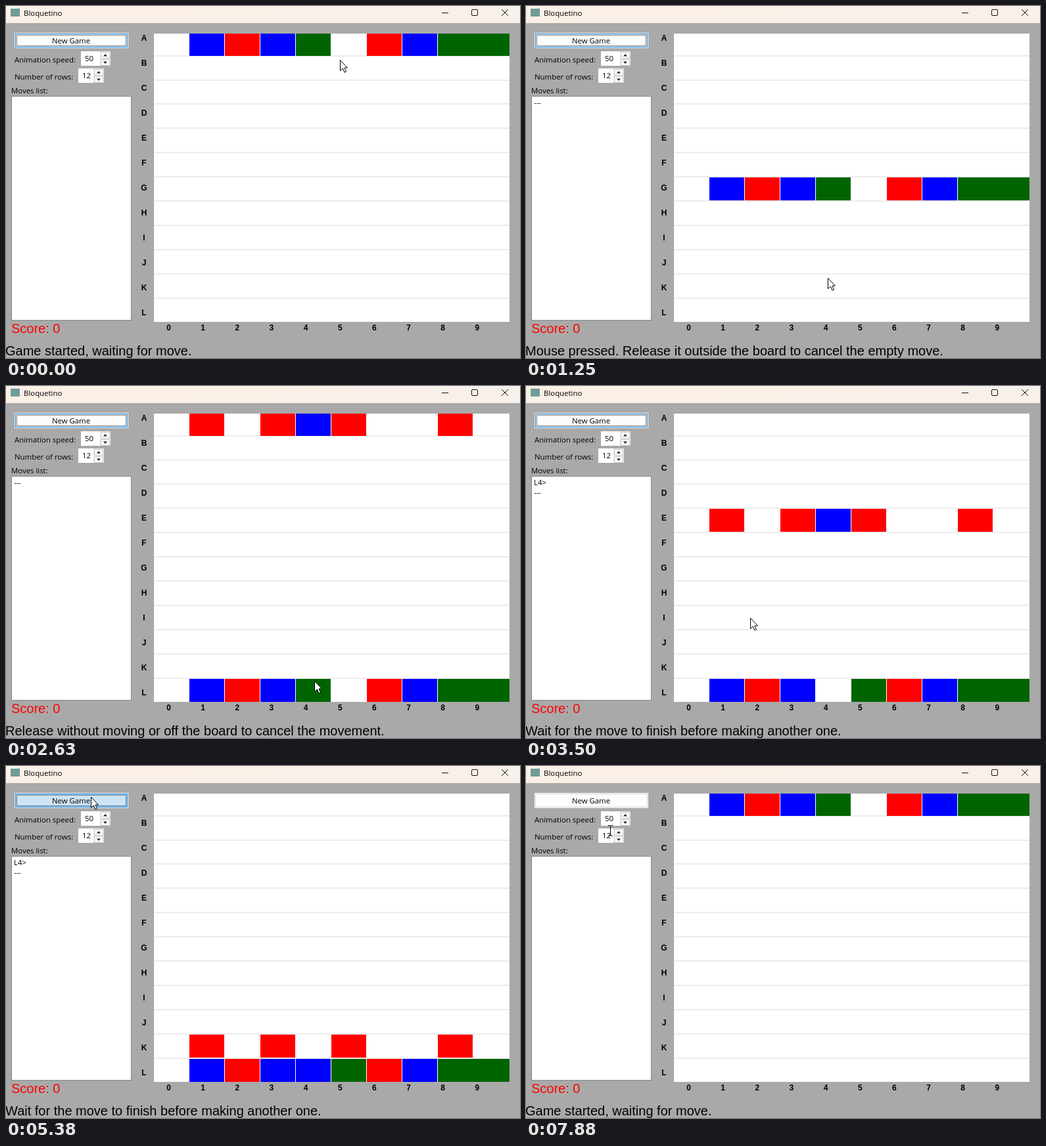
An HTML page with a canvas that plays this animation: 782 by 536 pixels, repeating every 8000 ms.

```html
<!DOCTYPE html>
<html lang="en">
<head>
<meta charset="utf-8">
<title>Bloquetino</title>
<style>
html, body { margin: 0; width: 100%; height: 100%; overflow: hidden; background: #a9a9a9; }
canvas { display: block; }
</style>
</head>
<body>
<canvas id="stage" width="782" height="536"></canvas>
<script>
const ctx = document.getElementById('stage').getContext('2d');
const LOOP = 8000, TICK = 125, ROW_TIME = 167;
const EMPTY_MOVE = 365, NEW_ROW = 2200, SLIDE = 2754, RESTART = 6000, BLUR = 7300;
const BOARD = { x: 225, y: 42, w: 541, h: 439 };
const RED = '#ff0000', BLUE = '#0000ff', GREEN = '#006400';
const UI = '11.4px "Open Sans", "Noto Sans", sans-serif';
const BIG = '20px "Liberation Sans", Arial, sans-serif';
const LABEL = 'bold 12px "Liberation Sans", Arial, sans-serif';

// Blocks: column, colour, width in cells
const firstRow = [[1, BLUE], [2, RED], [3, BLUE], [4, GREEN], [6, RED], [7, BLUE], [8, GREEN, 2]];
const slidRow = firstRow.map(([c, color, n]) => [c === 4 ? 5 : c, color, n]);
const secondRow = [[1, RED], [3, RED], [4, BLUE], [5, RED], [8, RED]];

// Pointer path: time, x, y
const path = [
  [0, 508, 82], [250, 507, 88], [500, 502, 130], [1250, 459, 414], [1750, 462, 432],
  [2375, 469, 449], [2625, 469, 449], [2875, 500, 448], [3500, 341, 353],
  [4500, 139, 35], [5000, 131, 46], [5625, 128, 48], [6500, 128, 48], [7500, 128, 98], [LOOP, 128, 98]
];

function rect(x, y, w, h, color) {
  ctx.fillStyle = color;
  ctx.fillRect(x, y, w, h);
}

function frame(x, y, w, h, color) {
  ctx.strokeStyle = color;
  ctx.lineWidth = 1;
  ctx.strokeRect(x + 0.5, y + 0.5, w - 1, h - 1);
}

function text(str, x, y, font = UI, color = '#000', align = 'left') {
  ctx.font = font;
  ctx.fillStyle = color;
  ctx.textAlign = align;
  ctx.fillText(str, x, y);
}

function polygon(points, fill, stroke) {
  ctx.beginPath();
  points.forEach(([x, y]) => ctx.lineTo(x, y));
  ctx.closePath();
  ctx.fillStyle = fill;
  ctx.fill();
  if (stroke) {
    ctx.strokeStyle = stroke;
    ctx.lineWidth = 1;
    ctx.stroke();
  }
}

function titleBar() {
  const shade = ctx.createLinearGradient(0, 0, 782, 0);
  shade.addColorStop(0, '#fbf0e6');
  shade.addColorStop(1, '#f8f0ea');
  rect(0, 0, 782, 26, shade);
  rect(7, 4, 14, 12, '#6f9c98');
  text('Bloquetino', 27, 15);
  rect(663, 10, 10, 1, '#111');
  ctx.strokeStyle = '#111';
  ctx.lineWidth = 1;
  ctx.beginPath();
  ctx.roundRect(708.5, 5.5, 9, 9, 1.5);
  ctx.moveTo(754, 5);
  ctx.lineTo(764, 15);
  ctx.moveTo(764, 5);
  ctx.lineTo(754, 15);
  ctx.stroke();
}

function button(focused, hover) {
  rect(13, 41, 173, 23, '#fff');
  rect(14, 42, 171, 21, hover ? '#cce4f7' : '#fdfdfd');
  if (focused) {
    frame(14, 42, 171, 21, '#0078d7');
    ctx.setLineDash([1, 1]);
    frame(16, 44, 167, 17, '#000');
    ctx.setLineDash([]);
  } else {
    frame(14, 42, 171, 21, '#d0d0d0');
  }
  text('New Game', 99, 57, UI, '#000', 'center');
}

function spinner(x, y, fieldWidth, value) {
  rect(x, y, fieldWidth + 16, 22, '#f0f0f0');
  rect(x, y, fieldWidth, 22, '#fff');
  text(value, x + 6, y + 15);
  const left = x + fieldWidth + 1, mid = left + 7;
  for (const [top, dir] of [[y + 1, -1], [y + 12, 1]]) {
    rect(left, top, 14, 10, '#fcfcfc');
    frame(left, top, 14, 10, '#c8c8c8');
    const cy = top + 5;
    polygon([[mid - 3, cy - dir * 1.5], [mid + 3, cy - dir * 1.5], [mid, cy + dir * 2]], '#222');
  }
}

function sidePanel(t, moves) {
  button(t < BLUR, t >= 4875 && t < 6900);
  text('Animation speed:', 13, 86);
  spinner(114, 69, 29, '50');
  text('Number of rows:', 13, 112);
  spinner(110, 95, 23, '12');
  text('Moves list:', 8, 133);
  rect(8, 137, 183, 342, '#fff');
  frame(8, 137, 183, 342, '#828790');
  moves.forEach((move, i) => text(move, 12, 151 + 15 * i));
  text('Score: 0', 8, 498, BIG, RED);
}

const rowEdge = i => 186 + (i - 4) * (i < 4 ? 36.5 : 37);
const columnX = c => Math.floor(BOARD.x + 54.1 * c);

function boardGrid() {
  rect(BOARD.x, BOARD.y, BOARD.w, BOARD.h, '#fff');
  for (let i = 0; i < 12; i++) {
    if (i) rect(BOARD.x, Math.floor(rowEdge(i)) - 1, BOARD.w, 2, '#ececec');
    text('ABCDEFGHIJKL'[i], 210, 53 + 38 * i, LABEL, '#000', 'center');
  }
  for (let c = 0; c < 10; c++) {
    text(String(c), 247.5 + 52.15 * c, 494, LABEL, '#000', 'center');
  }
}

function blocks(list, row, lowest = () => row) {
  for (const [c, color, n = 1] of list) {
    const i = Math.min(row, lowest(c));
    const top = i ? Math.floor(rowEdge(i)) + 1 : BOARD.y;
    const bottom = i === 11 ? 481 : Math.floor(rowEdge(i + 1)) - (i ? 1 : 0);
    const x = columnX(c), end = columnX(c + n);
    rect(x, top, end - x - (c + n < 10 ? 1 : 0), bottom - top, color);
  }
}

const fallenRows = (t, start) => Math.max(0, Math.min(11, Math.ceil((t - start) / ROW_TIME)));

function pieces(t) {
  if (t >= RESTART) return blocks(firstRow, 0);
  blocks(t < SLIDE ? firstRow : slidRow, fallenRows(t, EMPTY_MOVE));
  if (t >= NEW_ROW) {
    blocks(secondRow, fallenRows(t, SLIDE + ROW_TIME), c => c === 4 ? 11 : 10);
  }
}

function status(t) {
  if (t < 250 || t >= RESTART) return 'Game started, waiting for move.';
  if (t < 2450) return 'Mouse pressed. Release it outside the board to cancel the empty move.';
  if (t < SLIDE) return 'Release without moving or off the board to cancel the movement.';
  return 'Wait for the move to finish before making another one.';
}

function movesAt(t) {
  if (t < EMPTY_MOVE || t >= RESTART) return [];
  return t < SLIDE ? ['---'] : ['L4>', '---'];
}

function pointerAt(t) {
  const k = path.findIndex(p => p[0] > t);
  const [t0, x0, y0] = path[k - 1], [t1, x1, y1] = path[k];
  const u = (t - t0) / (t1 - t0);
  return [Math.round(x0 + (x1 - x0) * u), Math.round(y0 + (y1 - y0) * u)];
}

function pointer(t) {
  const [x, y] = pointerAt(t);
  if (t > BOARD.y && t >= RESTART && y > 69) {
    rect(x, y - 7, 1, 15, '#000');
    for (const dy of [-8, 8]) {
      rect(x - 3, y + dy, 3, 1, '#000');
      rect(x + 1, y + dy, 3, 1, '#000');
    }
    return;
  }
  const arrow = [[0, 0], [0, 16], [4, 12.5], [6.5, 18.5], [9, 17.5], [6.5, 11.5], [11, 11.5]];
  polygon(arrow.map(([dx, dy]) => [x + dx + 0.5, y + dy + 0.5]), '#fff', '#000');
}

function draw(now) {
  const t = Math.floor((now % LOOP) / TICK) * TICK;
  rect(0, 0, 782, 536, '#a9a9a9');
  titleBar();
  sidePanel(t, movesAt(t));
  boardGrid();
  pieces(t);
  text(status(t), -1, 532, BIG);
  pointer(t);
  requestAnimationFrame(draw);
}
requestAnimationFrame(draw);
</script>
</body>
</html>
```
